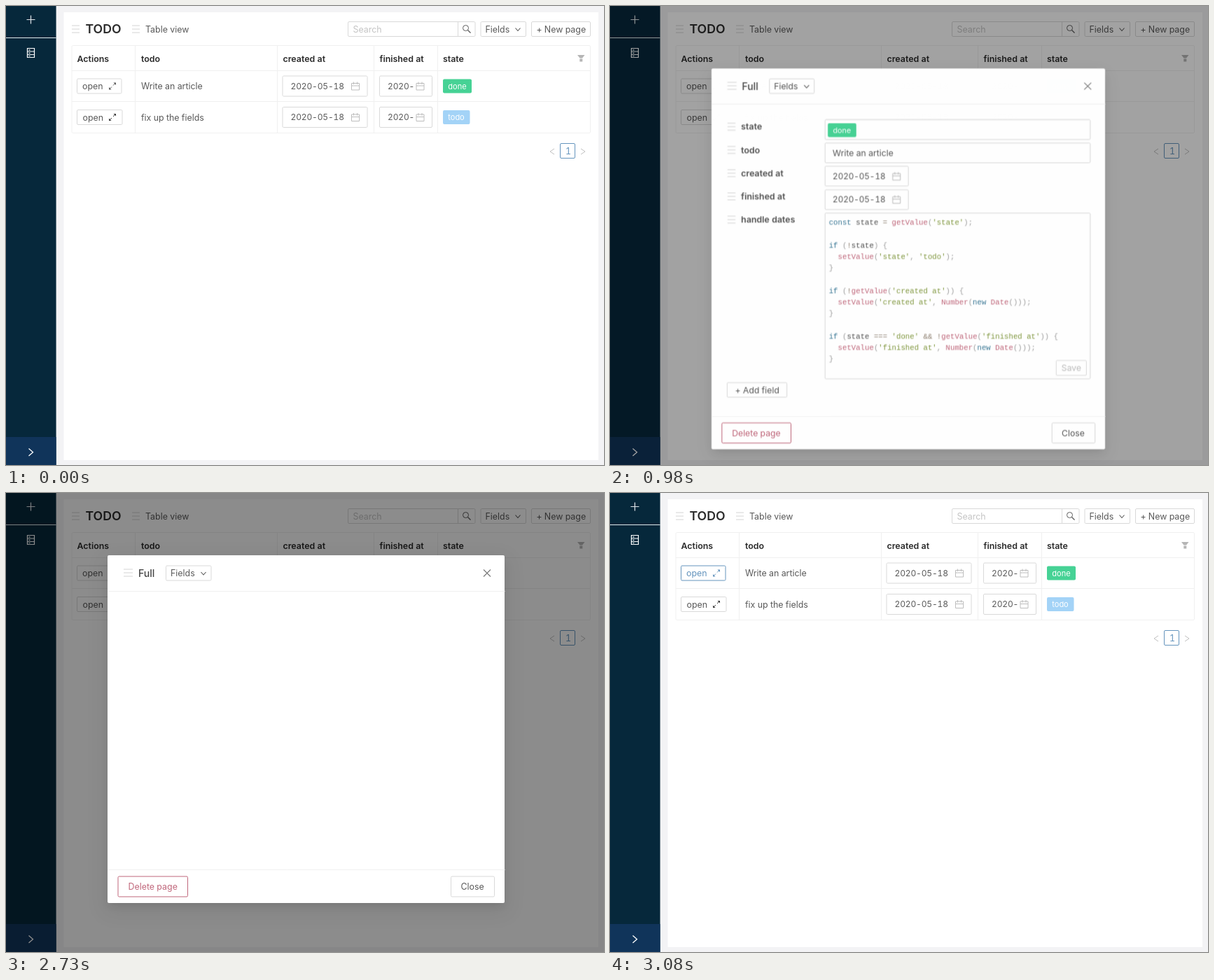
An HTML page for the animation above (3.15 s loop, 854 px wide and 656 px high).

```html
<!DOCTYPE html>
<html lang="en">
<head>
<meta charset="utf-8">
<title>Todo table</title>
<style>
  html, body { margin: 0; width: 100%; height: 100%; overflow: hidden; background: #fff; }
  #stage { position: relative; width: 854px; height: 656px; overflow: hidden; }
  svg { position: absolute; left: 0; top: 0; overflow: visible; }
  text { font-family: Inter, "Open Sans", sans-serif; white-space: pre; font-variant-numeric: tabular-nums; }
  .code { font-family: "Liberation Mono", "DejaVu Sans Mono", monospace; }
  #mask { position: absolute; inset: 0; background: #000; opacity: 0; }
  #modal {
    position: absolute; left: 144.5px; top: 89px; width: 567px; height: 549px;
    background: #fff; border-radius: 2px; transform-origin: -10.5px 23px; opacity: 0;
    box-shadow: 0 3px 6px -4px rgba(0,0,0,.12), 0 6px 16px rgba(0,0,0,.08), 0 9px 28px 8px rgba(0,0,0,.05);
  }
  #modal svg { left: -144.5px; top: -89px; }
</style>
</head>
<body>
<div id="stage">
  <svg id="page" width="854" height="656"></svg>
  <div id="mask"></div>
  <div id="modal"><svg id="dialog" width="854" height="656"></svg></div>
</div>
<script>
const LOOP = 3150, TICK = 70, LEAD = 17;
const BODY = '#595959', HEAD = '#2b2b2b', EDGE = '#d9d9d9', RULE = '#f0f0f0';
const BLUE = '#6494bd', RED = '#c0677b', GREEN = '#46d295', SKY = '#a3d3f7';
const $ = id => document.getElementById(id);

// Text is placed by its left end and the middle of its capitals.
const text = (x, y, str, { size = 12.4, fill = BODY, weight = 400, gap = 0 } = {}) =>
  `<text x="${x}" y="${y + size * .364}" font-size="${size}" fill="${fill}" font-weight="${weight}" letter-spacing="${gap}">${str}</text>`;
const box = (x, y, x2, y2, stroke = EDGE, extra = '') =>
  `<rect x="${x}" y="${y}" width="${x2 - x}" height="${y2 - y}" rx="1.5" fill="none" stroke="${stroke}" ${extra}/>`;
const fill = (x, y, w, h, color, rx = 0) =>
  `<rect x="${x}" y="${y}" width="${w}" height="${h}" rx="${rx}" fill="${color}"/>`;
const line = (d, stroke = BODY, width = 1) =>
  `<path d="${d}" fill="none" stroke="${stroke}" stroke-width="${width}"/>`;

const bars = (x, y, w = 11, step = 5) =>
  line([-step, 0, step].map(d => `M${x} ${y + d + .5}h${w}`).join(''), '#d4d4d4');
const chevron = (x, y) => line(`M${x - 3.5} ${y - 2}l3.5 4 3.5-4`, BODY, 1.1);
const calendar = (x, y) =>
  line(`M${x - 5.5} ${y - 4}h11v9.5h-11zM${x - 5.5} ${y - .5}h11M${x - 2.5} ${y - 6}v3.5M${x + 2.5} ${y - 6}v3.5`, '#bdbdbd');
const expand = (x, y, color) =>
  line(`M${x + 1} ${y - 1}l3-3M${x - 1} ${y + 1}l-3 3`, color) +
  `<path d="M${x + 5} ${y - 5}v3.500l-3.500-3.500zM${x - 5} ${y + 5}v-3.500l3.500 3.500z" fill="${color}"/>`;
const tag = (x, y, w, str, color) =>
  fill(x, y, w, 20, color, 2) + text(x + 7.3, y + 10, str, { size: 11, fill: '#fff' });
const date = (x, y, str, iconX) => text(x, y, str, { size: 12, gap: -.15 }) + calendar(iconX, y);

function drawPage() {
  const head = { weight: 600, fill: HEAD };
  const rows = [[114.5, 'Write an article'], [159, 'fix up the fields']];
  const pale = [
    `<path d="M71.5 0H854V656H71.5zM82.5 9V649H846V9z" fill="#f3f3f5"/>`,
    box(94, 56.5, 834.5, 181.5, RULE),
    line('M94 92.5H834.5M94 136.5H834.5M184.5 56.5V181.5M387.5 56.5V181.5M525.5 56.5V181.5M616.5 56.5V181.5', RULE),
    bars(94, 32.5), bars(180, 32.5),
    box(488.5, 22.5, 670, 43.5), line('M645.5 22.5V43.5', EDGE),
    box(678, 22.5, 742.5, 43.5), box(750.5, 22.5, 834.5, 43.5),
    box(101.5, 148.5, 166, 169.5),
    ...rows.map(([y]) => box(395, y - 14.5, 516, y + 14.5) + box(533.5, y - 14.5, 608.5, y + 14.5))
  ];
  const side = [
    fill(0, 0, 71.6, 656, '#06283b'), fill(0, 616, 71.6, 40, '#10345a'),
    fill(0, 45, 71.6, 1, '#e4e9ec'),
    line('M29.5 19.5H41.5M35.5 13.5V25.5', '#dfe5e9', 1.2),
    line('M30.5 60.5h10v13h-10zM30.5 65h10M30.5 69.5h10M32.5 62.8h2M32.5 67.3h2M32.5 71.5h2', '#fff', 1.2),
    line('M32.5 632.5l6 5.2-6 5.2', '#fff', 1.3)
  ];
  const top = [
    text(113.5, 33, 'TODO', { size: 17.7, weight: 600, fill: HEAD }),
    text(199, 33, 'Table view'),
    text(495.5, 33, 'Search', { fill: '#c4c4c4' }),
    `<circle cx="656.5" cy="31.5" r="4" fill="none" stroke="${BODY}"/>`, line('M659.5 34.5l4 4', BODY, 1.2),
    text(684.5, 33, 'Fields'), chevron(731, 33.5), text(757.5, 33, '+ New page')
  ];
  const table = [
    text(101.5, 75, 'Actions', head), text(193, 75, 'todo', head),
    text(395.5, 75, 'created at', head), text(533.5, 75, 'finished at', head), text(624, 75, 'state', head),
    '<path d="M816 70h10.5l-3.5 4.5h-3.5zM819.3 75.5h4v4h-4z" fill="#b5b5b5"/>',
    ...rows.map(([y, title]) => text(193, y, title) + date(406.5, y, '2020-05-18', 499) + date(545, y, '2020-', 591.5)),
    tag(624, 104.5, 41, 'done', GREEN), tag(624, 149, 38.5, 'todo', SKY),
    box(101.5, 104, 165, 125, EDGE, 'id="openEdge"'),
    `<g id="openLabel" color="${BODY}">${text(109, 114.5, 'open', { fill: 'currentColor' })}${expand(152, 114.5, 'currentColor')}</g>`,
    text(109.5, 159, 'open'), expand(152, 159, '#3c3c3c'),
    line('M783 204l-6 4 6 4', '#bfbfbf'), line('M821 204l6 4-6 4', '#bfbfbf'),
    box(791.5, 196.5, 812.5, 217.5, BLUE), text(799, 207.5, '1', { fill: BLUE })
  ];
  $('page').innerHTML = `<g id="pale">${pale.join('')}</g>` + [...side, ...top, ...table].join('');
}

const SCRIPT = `const state = getValue('state');

if (!state) {
  setValue('state', 'todo');
}

if (!getValue('created at')) {
  setValue('created at', Number(new Date()));
}

if (state === 'done' && !getValue('finished at')) {
  setValue('finished at', Number(new Date()));
}`;
const TOKENS = /('[^']*')|\b(const|if|new)\b|\b(getValue|setValue|Number|Date)\b|([=!&]+)|([(){};,]+)/g;
const INKS = ['#81983f', '#3a7896', RED, '#8f8171', '#a0a0a0'];

const paint = row => row.replace(TOKENS, (word, ...groups) => {
  const ink = INKS[groups.slice(0, INKS.length).findIndex(Boolean)];
  return `<tspan fill="${ink}">${word.replace(/&/g, '&amp;')}</tspan>`;
});
const code = (x, y) => SCRIPT.split('\n').map((row, i) =>
  `<text class="code" x="${x}" y="${y + i * 16.38}" font-size="10.88" fill="#505050">${paint(row)}</text>`).join('');

function drawDialog() {
  const labels = ['state', 'todo', 'created at', 'finished at', 'handle dates'];
  const header = [
    bars(167, 113.5, 13), text(188, 114.5, 'Full', { size: 14.1, weight: 500, fill: '#444' }),
    box(227.5, 104, 292, 125), text(234, 114.5, 'Fields'), chevron(281, 115),
    line('M681 109.5l10 10M691 109.5l-10 10', '#777', 1.1),
    line('M144.5 140.5H711.5', RULE)
  ];
  const form = [
    ...labels.map((label, i) => {
      const y = 173 + i * 33.5;
      return bars(167, y - .5, 11.5) + text(186.5, y, label, { size: 12.5, weight: 600, fill: '#505050' });
    }),
    box(307.5, 163, 689.5, 191.5), tag(311.5, 168, 41, 'done', GREEN),
    box(307.5, 196.5, 689.5, 225), text(318.5, 211, 'Write an article'),
    box(307.5, 230, 427.5, 258.5), date(318.5, 244.5, '2020-05-18', 410.5),
    box(307.5, 264, 427.5, 292.5), date(318.5, 278, '2020-05-18', 410.5),
    box(307.5, 297.5, 689.5, 536.5), code(313, 314.7),
    box(640.5, 510, 684, 531.5), text(648, 521, 'Save', { fill: '#bdbdbd' }),
    box(166.5, 542, 252.5, 563), text(178, 552.5, '+ Add field')
  ];
  const footer = [
    line('M144.5 590.5H711.5', RULE),
    box(159, 600, 258.5, 629, RED), text(173.5, 614.5, 'Delete page', { fill: RED }),
    box(634.5, 600, 696.5, 629), text(648.5, 614.5, 'Close')
  ];
  $('dialog').innerHTML = header.join('') +
    `<g id="form">${form.join('')}</g><g id="footer">${footer.join('')}</g>`;
}

// Each track is a list of [time, value, easing to the next step].
const HOLD = 'steps(1, end)';
const OUT = 'cubic-bezier(.08,.82,.17,1)', IN_OUT = 'cubic-bezier(.78,.14,.15,.86)';
const animations = [];
function track(id, prop, steps) {
  const first = steps[0], last = steps[steps.length - 1];
  const frames = [[0, first[1], HOLD], ...steps, [LOOP, last[1]]].map(([at, value, easing = 'linear']) =>
    ({ offset: at / LOOP, [prop]: value, easing }));
  const motion = $(id).animate(frames, { duration: LOOP, fill: 'both' });
  motion.pause();
  animations.push(motion);
}
const hover = (id, prop, rest) => track(id, prop, [
  [245, rest], [420, BLUE, HOLD], [910, rest, HOLD], [2870, BLUE]
]);

drawPage();
drawDialog();

hover('openEdge', 'stroke', EDGE);
hover('openLabel', 'color', BODY);
track('mask', 'opacity', [[744, 0], [1034, .45, HOLD], [2730, .45, IN_OUT], [2958, 0]]);
track('modal', 'transform', [
  [751, 'scale(.2)', OUT], [1076, 'scale(1)', HOLD], [2730, 'scale(1)', IN_OUT], [2940, 'scale(.2)']
]);
track('modal', 'opacity', [[744, 0, OUT], [1044, 1, HOLD], [2730, 1, IN_OUT], [2870, 0]]);
track('modal', 'height', [[0, '549px', HOLD], [2660, '497px']]);
track('footer', 'transform', [[0, 'translateY(0px)', HOLD], [2660, 'translateY(-52px)']]);
track('form', 'opacity', [[0, 1, HOLD], [2660, 0]]);
track('pale', 'opacity', [[0, 1, HOLD], [2870, 0, HOLD], [2940, 1]]);

const start = performance.now();
function tick() {
  const now = (performance.now() - start + LEAD) % LOOP;
  const time = Math.floor(now / TICK) * TICK;
  for (const motion of animations) motion.currentTime = time;
  requestAnimationFrame(tick);
}
tick();
</script>
</body>
</html>
```
